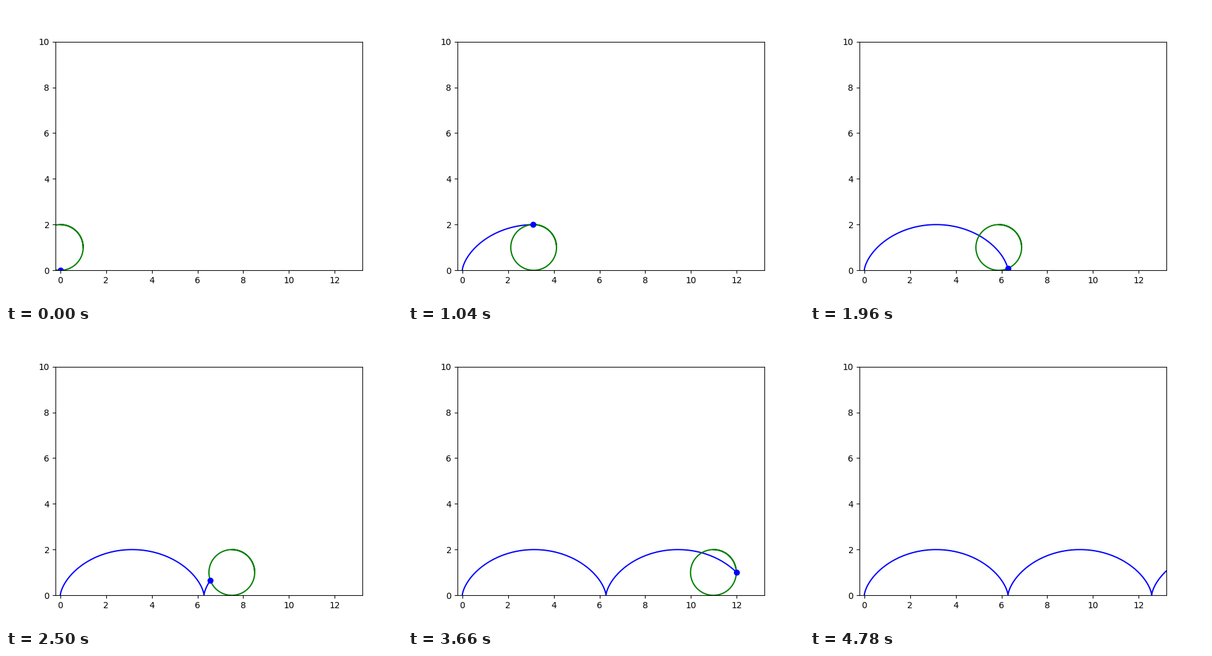
Write a matplotlib script that moves like this. It is 640 px wide and 480 px high and loops after 5.21 s.

```python
import matplotlib.pyplot as plt
import numpy as np
from matplotlib.animation import FuncAnimation

STEP = 0.06        # roll angle per step, radians
TICK = 10          # ms per frame
LOOP = 5210        # ms per loop
STEP_TICKS = 2     # frames between two steps
HEIGHT = 10        # visible units, vertically
CENTER_X = 6.5

plt.rcParams["font.family"] = "DejaVu Sans"
fig, ax = plt.subplots(figsize=(6.4, 4.8), dpi=100)

# Same scale on both axes, so the wheel stays round.
box = ax.get_window_extent()
half_width = HEIGHT * box.width / box.height / 2
ax.set_xlim(CENTER_X - half_width, CENTER_X + half_width)
ax.set_ylim(0, HEIGHT)

# The rim runs a quarter turn past a full circle.
rim = np.linspace(0, 2.5 * np.pi, 120)
rim_x, rim_y = np.cos(rim), 1 + np.sin(rim)

trail, = ax.plot([], [], "b-")
wheel, = ax.plot([], [], "g-")
dot, = ax.plot([], [], "bo")


def cycloid(angle):
    return angle - np.sin(angle), 1 - np.cos(angle)


def update(frame):
    angles = STEP * np.arange(frame // STEP_TICKS + 1)
    x, y = cycloid(angles)
    trail.set_data(x, y)
    wheel.set_data(angles[-1] + rim_x, rim_y)
    dot.set_data(x[-1:], y[-1:])
    return trail, wheel, dot


anim = FuncAnimation(fig, update, frames=LOOP // TICK, interval=TICK,
                     repeat=True, repeat_delay=0)
plt.show()
```
